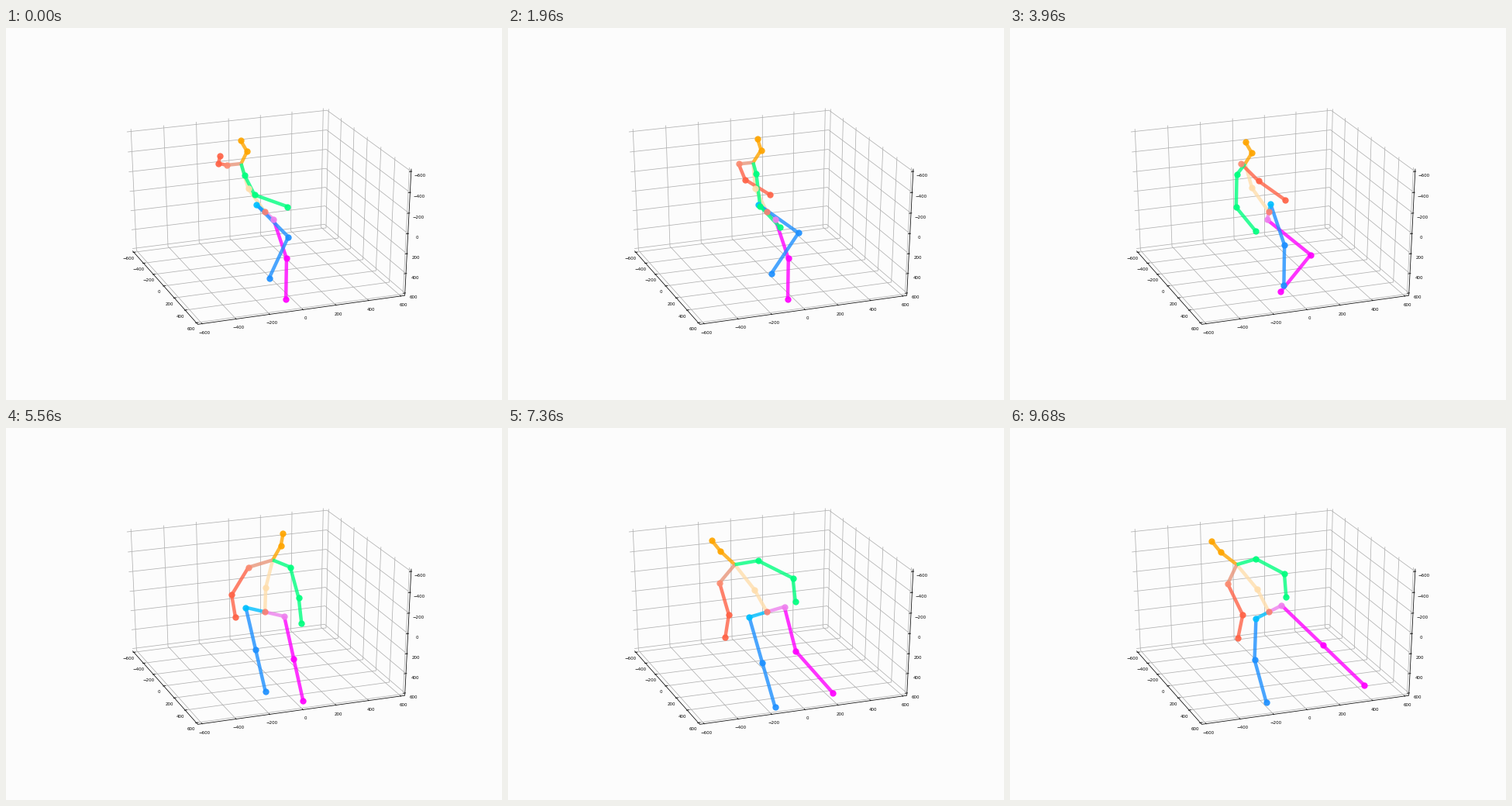
Write a matplotlib script that moves like this. It is 640 px wide and 480 px high and loops after 9720 ms.

```python
import numpy as np
import matplotlib.pyplot as plt
from matplotlib.animation import FuncAnimation
from matplotlib.collections import LineCollection

W, H = 640, 480
FRAMES, STEP = 243, 40
LIMIT = 600
EDGE = 1 + 1 / 24
UP = np.array([0, 0, 1])

# Body sizes in the units of the axes.
HIP, SHOULDER = 136, 145
UPPER_ARM, FOREARM = 290, 245
LEG_PART, LEG_DOWN = 425, 842

BONES = [
    ("pelvis", "spine", "navajowhite"), ("spine", "thorax", "navajowhite"),
    ("thorax", "nose", "orange"), ("nose", "head", "orange"),
    ("thorax", "shoulder_l", "darksalmon"),
    ("shoulder_l", "elbow_l", "tomato"), ("elbow_l", "wrist_l", "tomato"),
    ("pelvis", "hip_r", "violet"),
    ("hip_r", "knee_r", "magenta"), ("knee_r", "ankle_r", "magenta"),
    ("pelvis", "hip_l", "deepskyblue"),
    ("hip_l", "knee_l", "dodgerblue"), ("knee_l", "ankle_l", "dodgerblue"),
    ("thorax", "shoulder_r", "springgreen"),
    ("shoulder_r", "elbow_r", "springgreen"),
    ("elbow_r", "wrist_r", "springgreen"),
]
# A joint takes the colour of the bone that ends there.
JOINTS = {end: color for _, end, color in BONES if end != "thorax"}
JOINTS.update(pelvis="salmon", shoulder_l="#fa8c72")


def project(a, b, c):
    """Box coordinates (right, away, up), each -1 to 1, to the screen."""
    depth = 1 + 0.0155 * a + 0.0426 * b - 0.0211 * c
    return (334.1 + (126.1 * a - 46.1 * b) / depth,
            237.3 - (15.5 * a + 41.6 * b + 76.8 * c) / depth)


def ease(t, start, end):
    u = np.clip((t - start) / (end - start), 0, 1)
    return u * u * (3 - 2 * u)


def bump(t, centre, width):
    return np.exp(-((t - centre) / width) ** 2)


def heading(yaw):
    """Left and forward directions for the angle of the hip line."""
    c, s = np.cos(np.radians(yaw)), np.sin(np.radians(yaw))
    return np.array([c, s, 0]), np.array([s, -c, 0])


def limb(length, swing, spread, forward, out):
    swing, spread = np.radians([swing, spread])
    flat = np.sin(swing) * forward - np.cos(swing) * UP
    return length * (np.cos(spread) * flat + np.sin(spread) * out)


def bend_leg(hip, reach, forward):
    """Knee position between the hip and the foot, bent to the front."""
    dist = np.linalg.norm(reach)
    axis = reach / dist
    front = forward - forward.dot(axis) * axis
    front = front / np.linalg.norm(front)
    bend = np.sqrt(max(LEG_PART ** 2 - dist ** 2 / 4, 0))
    return hip + reach / 2 + bend * front


def pose(t):
    lower = ease(t, 0.3, 1.9)    # raised arms come down
    relax = ease(t, 4, 5.6)      # walk ends, body opens up
    depart = ease(t, 5.6, 7.3)   # leans into the walk away

    left, forward = heading(91 - 31 * ease(t, 1.8, 4) + 157 * ease(t, 3.4, 8.3))
    phase = np.pi * np.interp(t, [1.96, 3.96, 5.56, 7.36, 8.72, 9.68],
                              [0, 3, 4, 4.87, 6, 6.5])
    stride = np.sin(phase)

    # Trunk and head
    tilt = (-143 + 60 * bump(t, 1.96, 0.7) + 190 * bump(t, 5.56, 0.6)
            - 50 * ease(t, 6, 7.4))
    p = {"pelvis": np.zeros(3)}
    p["thorax"] = np.array([tilt, 0, 505])
    p["spine"] = p["thorax"] / 2 - 30 * forward
    p["nose"] = p["thorax"] + 65 * forward + [0.2 * tilt, 0, 110]
    p["head"] = p["nose"] + [0.27 * tilt, 0, 115]

    # Upper arm swing and spread, forearm swing and spread
    arms = {
        "l": (20 - 32 * relax - 8 * stride,
              64 - 36 * lower - 28 * ease(t, 4, 7.4),
              197 - 157 * lower - 32 * relax,
              -45 * (1 - lower)),
        "r": (20 - 20 * lower - 27 * depart + 8 * stride,
              -18 + 30 * lower + 28 * depart,
              53 - 26 * lower - 27 * relax,
              5),
    }
    drop = 25 + 30 * ease(t, 4, 6.5)
    shift = 125 * bump(t, 5.56, 0.8)
    base = 80 - 400 * ease(t, 5, 7.3)
    height = (60 + 50 * lower + 50 * depart) * (1 - bump(t, 5.56, 0.4))

    for side, sign in (("l", 1), ("r", -1)):
        out = sign * left
        swing, spread, fore_swing, fore_spread = arms[side]
        shoulder = (p["thorax"] + SHOULDER * out - 35 * forward
                    - (55 + sign * drop) * UP)
        elbow = shoulder + limb(UPPER_ARM, swing, spread, forward, out)
        wrist = elbow + limb(FOREARM, fore_swing, fore_spread, forward, out)

        hip = HIP * out
        ahead = base + sign * 250 * stride
        lift = height * max(sign * np.cos(phase), 0)
        longest = np.sqrt(4 * LEG_PART ** 2 - ahead ** 2 - shift ** 2)
        down = min(LEG_DOWN - lift, longest)
        reach = ahead * forward - shift * left - down * UP
        knee = bend_leg(hip, reach, forward)

        names = ("shoulder", "elbow", "wrist", "hip", "knee", "ankle")
        points = (shoulder, elbow, wrist, hip, knee, hip + reach)
        p.update({f"{n}_{side}": q for n, q in zip(names, points)})

    return {name: project(*(q / LIMIT)) for name, q in p.items()}


def draw_box(ax):
    e = EDGE
    grid, black = [], []

    def label(value, point, dx, dy):
        ax.text(point[0] + dx, point[1] + dy, str(value).replace("-", "\u2212"),
                fontsize=4, ha="center", va="center")

    for value in range(-LIMIT, LIMIT + 1, 200):
        s = value / LIMIT
        grid += [[project(s, -e, -e), project(s, e, -e), project(s, e, e)],
                 [project(-e, -s, -e), project(e, -s, -e), project(e, -s, e)],
                 [project(-e, e, -s), project(e, e, -s), project(e, -e, -s)]]
        # Short ticks, longer on the inner side.
        black += [[project(s, -e - 0.01, -e), project(s, -e + 0.02, -e)],
                  [project(-e - 0.01, -s, -e), project(-e + 0.02, -s, -e)],
                  [project(e + 0.01, -e, -s), project(e - 0.02, -e, -s)]]
        label(value, project(s, -e, -e), 3, 11.5)
        label(value, project(-e, -s, -e), -6.5, 8)
        label(value, project(e, -e, -s), 11.5, 5.2)

    black.append([project(-e, e, -e), project(-e, -e, -e),
                  project(e, -e, -e), project(e, -e, e)])
    for lines, color in ((grid, "#b0b0b0"), (black, "black")):
        ax.add_collection(LineCollection(lines, colors=color, linewidths=0.55))


fig = plt.figure(figsize=(W / 100, H / 100), dpi=100, facecolor="#fcfcfc")
ax = fig.add_axes([0, 0, 1, 1])
ax.set_xlim(0, W)
ax.set_ylim(H, 0)
ax.axis("off")
draw_box(ax)

bones = [ax.plot([], [], color=color, lw=3.2, alpha=0.8, zorder=3,
                 solid_capstyle="butt")[0] for _, _, color in BONES]
dots = {name: ax.plot([], [], "o", color=color, ms=6, mew=0, alpha=0.92,
                      zorder=4)[0] for name, color in JOINTS.items()}


def update(frame):
    points = pose(frame * STEP / 1000)
    for line, (start, end, _) in zip(bones, BONES):
        line.set_data(*zip(points[start], points[end]))
    for name, dot in dots.items():
        x, y = points[name]
        dot.set_data([x], [y])
    return bones + list(dots.values())


anim = FuncAnimation(fig, update, frames=FRAMES, interval=STEP,
                     repeat=True, repeat_delay=0)
plt.show()
```
